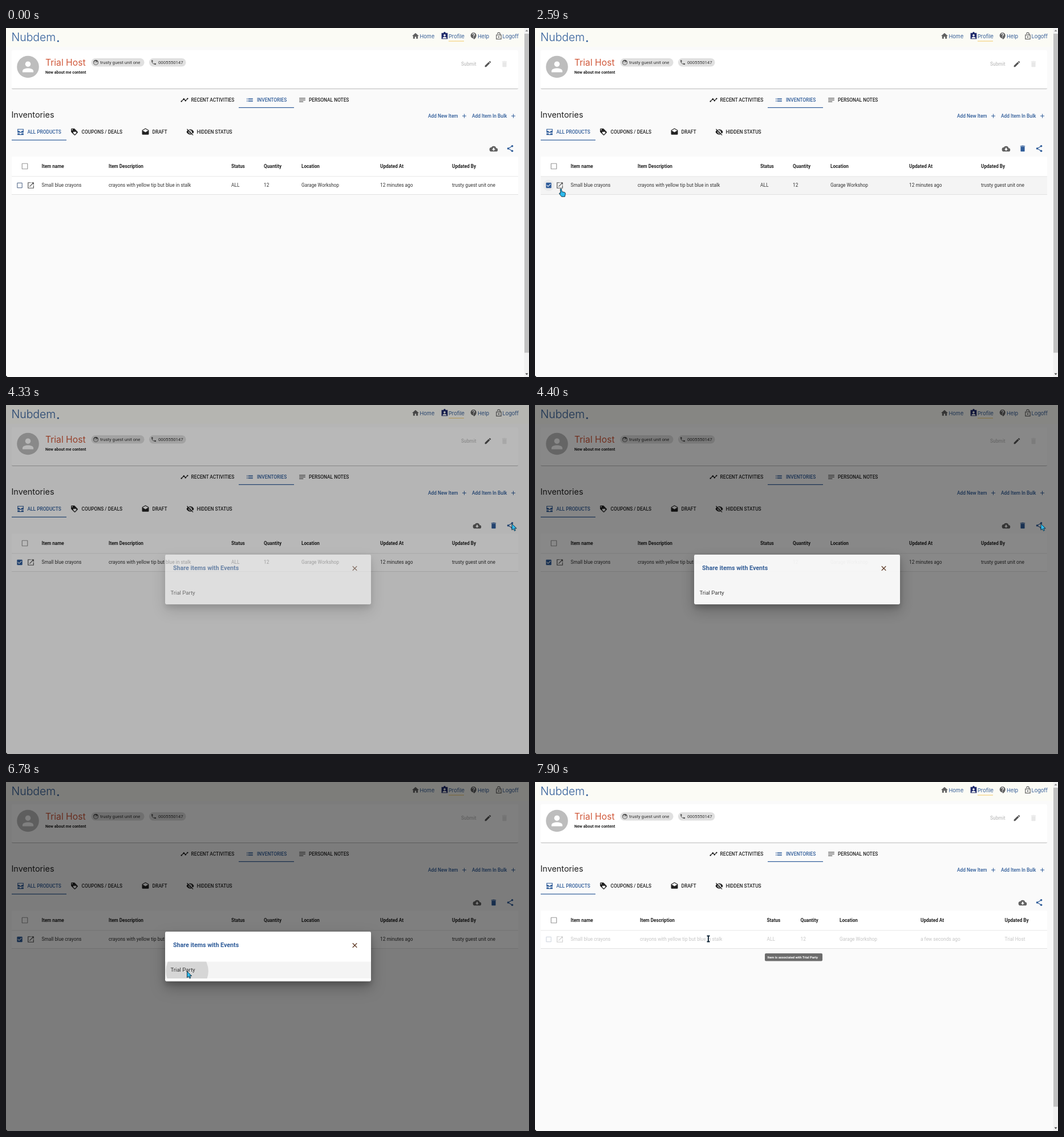
These frames come from a looping animation (917 px wide and 611 px high, 8000 ms). An HTML page:

```html
<!DOCTYPE html>
<html lang="en">
<head>
<meta charset="utf-8">
<title>Inventory</title>
<style>
html, body { margin: 0; width: 100%; height: 100%; overflow: hidden; background: #fafafa; }
svg { display: block; }
text { font: 400 8.36px Roboto, sans-serif; fill: #333; white-space: pre; }
.tab { font-weight: 500; fill: #222; }
.blue { font-weight: 500; fill: #2f5c99; }
.head { font-weight: 700; font-size: 8.2px; fill: #222; }
.chip { font-size: 7.76px; }
.nav { font: 400 9.2px Inter, sans-serif; fill: #345c96; }
.logo { font: 300 19.4px Inter, sans-serif; fill: #2f5c99; }
.name { font: 400 15.7px Inter, sans-serif; fill: #d0583a; }
.title { font: 400 14.4px Inter, sans-serif; fill: #222; }
.about { font-weight: 700; font-size: 7.05px; fill: #222; }
.off { font-weight: 500; fill: #c2c2c2; }
.dialog { font-weight: 700; font-size: 10.7px; fill: #2f5c99; }
.item { font-size: 9.55px; }
.tip { font-weight: 700; font-size: 5.8px; fill: #fff; }
symbol { overflow: visible; fill: currentColor; fill-rule: evenodd; }
.s { fill: none; stroke: currentColor; stroke-width: 2; }
#modal { filter: drop-shadow(0 6px 4px rgba(0,0,0,.16)) drop-shadow(0 10px 12px rgba(0,0,0,.26)); }
#cursor path { fill: #2fbaec; stroke: #0c2233; stroke-width: .9; stroke-linejoin: round; }
</style>
</head>
<body>
<svg width="0" height="0" style="position:absolute">
<symbol id="home" viewBox="0 0 24 24"><path d="M10 20v-6h4v6h5v-8h3L12 3 2 12h3v8z"/></symbol>
<symbol id="badge" viewBox="0 0 24 24"><path d="M3 3h6a3 3 0 0 1 6 0h6v18H3zM12 7a3 3 0 1 0 .01 0zM6 19h12c0-6-12-6-12 0z"/></symbol>
<symbol id="help" viewBox="0 0 24 24"><path d="M11.5 2a8.5 8.5 0 0 0 0 17h.5v3a13 13 0 0 0 8-11.5A8.5 8.5 0 0 0 11.5 2z"/><path d="M8.5 8a3 3 0 1 1 4.6 2.5q-1.6 1-1.6 2.5m0 1.5v2" fill="none" stroke="#fff" stroke-width="2"/></symbol>
<symbol id="unlock" viewBox="0 0 24 24"><path class="s" d="M5 9h14v12H5zM8 6a4 4 0 0 1 8 0v3"/><circle cx="12" cy="15" r="2"/></symbol>
<symbol id="person" viewBox="0 0 24 24"><circle cx="12" cy="8" r="4"/><path d="M4 20v-2c0-5.3 16-5.3 16 0v2z"/></symbol>
<symbol id="face" viewBox="0 0 24 24"><circle class="s" cx="12" cy="12" r="9"/><path d="M3.5 11.5q4-1.5 6-5.8 3.5 5 11 4L17 4H7z"/><circle cx="9" cy="13" r="1.4"/><circle cx="15" cy="13" r="1.4"/></symbol>
<symbol id="phone" viewBox="0 0 24 24"><path d="M3 4q0-1 1-1h3.5q1 0 1 1 0 2 .5 3.6.2.6-.2 1l-2.2 2.2q2.2 4.4 6.6 6.6l2.2-2.2q.5-.4 1-.2 1.6.5 3.6.5 1 0 1 1V20q0 1-1 1A17 17 0 0 1 3 4z"/></symbol>
<symbol id="edit" viewBox="0 0 24 24"><path d="M3 17.2V21h3.8L17.8 9.9l-3.7-3.7zM15.1 5.1l3.8 3.8 2.2-2.5-3.4-3.4z"/></symbol>
<symbol id="trash" viewBox="0 0 24 24"><path d="M6 7h12v12q0 2-2 2H8q-2 0-2-2zM19 4h-3.5l-1-1h-5l-1 1H5v2h14z"/></symbol>
<symbol id="chart" viewBox="0 0 24 24"><path class="s" d="M3 16l7-7 5 5 6-6"/><circle cx="3" cy="16" r="2"/><circle cx="10" cy="9" r="2"/><circle cx="15" cy="14" r="2"/><circle cx="21" cy="8" r="2"/></symbol>
<symbol id="list" viewBox="0 0 24 24"><path class="s" d="M3 8h2m2 0h14M3 12h2m2 0h14M3 16h2m2 0h14"/></symbol>
<symbol id="notes" viewBox="0 0 24 24"><path class="s" d="M3 7h18M3 12h18M3 17h12"/></symbol>
<symbol id="inbox" viewBox="0 0 24 24"><path d="M3 3h18v11H3zM5 5v4h4a3 3 0 0 0 6 0h4V5zM3 16h6a3 3 0 0 0 6 0h6v5H3z"/></symbol>
<symbol id="tag" viewBox="0 0 24 24"><path d="M2 4q0-2 2-2h7q1 0 1.5.5l9 9q1 1.4 0 2.8l-7 7q-1.5 1.2-3 0l-9-9Q2 12 2 11zM5.5 4a1.5 1.5 0 1 0 .01 0zM13 19.5l-4.3-4.3a2.5 2.5 0 0 1 4.3-2.7 2.5 2.5 0 0 1 4.3 2.7z"/></symbol>
<symbol id="draft" viewBox="0 0 24 24"><path d="M2 8q0-1.2 1-1.7L12 1l9 5.3q1 .5 1 1.7v10q0 2-2 2H4q-2 0-2-2zM12 13l8.3-5.2L12 3 3.7 7.8z"/></symbol>
<symbol id="hidden" viewBox="0 0 24 24"><path d="M1 12q3.5-7.5 11-7.5T23 12q-3.5 7.5-11 7.5T1 12zM12 7a5 5 0 1 0 .01 0zM12 9a3 3 0 1 0 .01 0z"/><path d="M4 2.2l18 18" stroke="#fafafa" stroke-width="2"/><path class="s" d="M2.6 3.6l17.8 17.8"/></symbol>
<symbol id="cloud" viewBox="0 0 24 24"><path d="M6 20a6 6 0 0 1-.7-12 7.5 7.5 0 0 1 14 2 5 5 0 0 1-.3 10zM17 13h-3V9h-4v4H7l5 5z"/></symbol>
<symbol id="share" viewBox="0 0 24 24"><path class="s" d="M18 5L6 12l12 7"/><circle cx="18" cy="5" r="3"/><circle cx="6" cy="12" r="3"/><circle cx="18" cy="19" r="3"/></symbol>
<symbol id="box" viewBox="0 0 24 24"><rect class="s" x="4" y="4" width="16" height="16" rx="1"/></symbol>
<symbol id="check" viewBox="0 0 24 24"><rect x="3" y="3" width="18" height="18" rx="2"/><path d="M5.7 11.3L10 15.6l8.3-8.3" fill="none" stroke="#fff" stroke-width="2"/></symbol>
<symbol id="open" viewBox="0 0 24 24"><path class="s" d="M12 4H4v16h16v-8M14 4h6v6M20 4L8.5 15.5"/></symbol>
<symbol id="plus" viewBox="0 0 24 24"><path class="s" d="M5 12h14M12 5v14"/></symbol>
<symbol id="cross" viewBox="0 0 24 24"><path class="s" d="M5.7 5.7l12.6 12.6m0-12.6L5.7 18.3"/></symbol>
</svg>
<svg id="stage" width="917" height="611" viewBox="0 0 917 611"></svg>
<script>
const BLUE = '#2f5c99', GREY = '#616161', DARK = '#222';
const $ = id => document.getElementById(id);
const icon = (id, x, y, color = DARK, size = 14.3) =>
  `<use href="#${id}" x="${x - size / 2}" y="${y - size / 2}" width="${size}" height="${size}" color="${color}"/>`;
const text = (s, x, y, cls = '') => `<text x="${x}" y="${y}" class="${cls}">${s}</text>`;
const rect = (x, y, w, h, fill, more = '') =>
  `<rect x="${x}" y="${y}" width="${w}" height="${h}" fill="${fill}" ${more}/>`;
const group = (id, ...parts) => `<g id="${id}">${parts.join('')}</g>`;

const guest = 'trusty guest unit one';
const heads = ['Item name', 'Item Description', 'Status', 'Quantity', 'Location', 'Updated At', 'Updated By'];
const item = ['Small blue crayons', 'crayons with yellow tip but blue in stalk', 'ALL', '12', 'Garage Workshop'];
const table = (id, xs, when, who, opacity) => group(id,
  heads.map((s, i) => text(s, xs[i], 245, 'head')).join(''),
  `<g opacity="${opacity}">`, [...item, when, who].map((s, i) => text(s, xs[i], 278)).join(''),
  icon('open', 43.5, 275.5, '#555'), '</g>');

$('stage').innerHTML = [
  rect(0, 0, 917, 611, '#fafafa'), rect(0, 0, 917, 33, '#fbfbf5'),
  text('Nubdem', 9.5, 23, 'logo'), `<circle cx="91.3" cy="23" r="1.6" fill="${BLUE}"/>`,
  icon('home', 718, 14, GREY), text('Home', 725.5, 18, 'nav'),
  icon('badge', 769, 14, '#1f2a6b'), text('Profile', 776, 18, 'nav'), rect(776, 22.5, 27, 1, '#f3c969'),
  icon('help', 820, 14, GREY), text('Help', 827, 18, 'nav'),
  icon('unlock', 864, 14, GREY), text('Logoff', 870.5, 18, 'nav'),

  rect(10, 39.5, 888, 67.5, '#bbb', 'rx="2"'), rect(9.7, 39, 888.6, 67, '#fff', 'rx="2"'),
  '<circle cx="38.5" cy="68" r="19.3" fill="#bdbdbd"/>', icon('person', 38.5, 68, '#fff', 28.6),
  text('Trial Host', 69, 66, 'name'),
  rect(149.5, 53, 93, 14.5, '#e0e0e0', 'rx="7.2"'), icon('face', 157.5, 60.3, '#444', 10.8),
  text(guest, 165, 63, 'chip'),
  rect(251, 53, 64.5, 14.5, '#e0e0e0', 'rx="7.2"'), icon('phone', 259, 60.3, '#555', 10.8),
  text('0005550147', 267, 63, 'chip'),
  group('about', text('New about me content', 69, 79.5, 'about')),
  group('skeleton', rect(69, 76.5, 237, 11.5, '#e0e0e0')),
  text('Submit', 798, 66, 'off'), icon('edit', 845, 63, '#555'), icon('trash', 874, 63, '#e8e8e8'),

  icon('chart', 313, 126), text('RECENT ACTIVITIES', 324.5, 128.6, 'tab'),
  icon('list', 427.5, 126, BLUE), text('INVENTORIES', 440, 128.6, 'blue'),
  icon('notes', 519.5, 126), text('PERSONAL NOTES', 531, 128.6, 'tab'), rect(408, 138.8, 97, 1.2, BLUE),
  text('Inventories', 9.5, 156.5, 'title'),
  text('Add New Item', 740, 157, 'blue'), icon('plus', 803.5, 154, BLUE, 12),
  text('Add Item In Bulk', 817, 157, 'blue'), icon('plus', 889.5, 154, BLUE, 12),
  icon('inbox', 25.5, 182, BLUE), text('ALL PRODUCTS', 37.5, 185, 'blue'), rect(10, 195.6, 96, 1.2, BLUE),
  icon('tag', 120, 182), text('COUPONS / DEALS', 132.5, 185, 'tab'),
  icon('draft', 244.5, 182), text('DRAFT', 256.5, 185, 'tab'),
  icon('hidden', 323, 182), text('HIDDEN STATUS', 334.5, 185, 'tab'),

  group('cloudAlone', icon('cloud', 855, 211.5, GREY)),
  group('bulk', icon('cloud', 826, 211.5, GREY), icon('trash', 855, 211, BLUE)),
  icon('share', 884, 211, BLUE),

  rect(10, 225, 888, 66.5, '#fff', 'rx="2"'), group('hover', rect(10, 260, 888, 31.5, '#f4f4f4')),
  rect(10, 259.5, 888, .8, '#e0e0e0'), rect(10, 291, 888, .8, '#dcdcdc'),
  icon('box', 33, 242, '#999'),
  '<circle id="halo" cx="24" cy="275.5" r="10" fill="rgba(0,0,0,.035)"/>',
  group('unticked', icon('box', 24, 275.5, '#4a6184', 12.5)),
  group('ticked', icon('check', 24, 275.5, BLUE, 12.5)),
  table('before', [62.5, 180, 395, 452, 518, 656, 782], '12 minutes ago', guest, 1),
  table('after', [62.5, 184, 406.5, 465.5, 534, 676, 823.5], 'a few seconds ago', 'Trial Host', .28),
  group('tooltip', rect(403, 300, 101, 13.5, '#6c6c6c', 'rx="2"'),
    text('Item is associated with Trial Party', 407.5, 309, 'tip')),

  group('scrollbar', rect(908.5, 0, 8.5, 611, '#f1f1f1'), rect(909, 10, 8, 558.5, '#c1c1c1'),
    '<path d="M910.5 6l2.5-3 2.5 3z" fill="#888"/><path d="M910.5 604.5l2.5 3 2.5-3z" fill="#444"/>'),
  group('backdrop', rect(0, 0, 917, 611, '#000')),
  group('modal', rect(279, 262, 361, 87, '#fff', 'rx="2.4"'),
    text('Share items with Events', 293, 289.3, 'dialog'), icon('cross', 611.5, 286, '#5b3620'),
    group('itemHover', rect(279, 314.5, 361, 29.5, '#f4f4f4')),
    '<clipPath id="itemBox"><rect x="279" y="314.5" width="361" height="29.5"/></clipPath>',
    '<circle id="ripple" cx="317.5" cy="331" fill="rgba(0,0,0,.12)" clip-path="url(#itemBox)"/>',
    text('Trial Party', 288.5, 332.2, 'item')),
  '<path d="M0 608.5v2.5h2.5z" fill="#000"/>',
  group('cursor',
    '<path id="arrow" d="M0 0v11l2.6-2.2 2 3.6 1.8-.9-1.8-3.5h3.6z"/>',
    '<path id="hand" d="M-1.2 0q1.4-1 2.2 0l.6 4.6 4.6 1q2 .6 1.6 3l-1 4.6H1L-3 8q0-2 2.4-.8z"/>',
    '<path id="beam" d="M-2.5-5H2.5M0-5V5M-2.5 5H2.5" style="stroke-width:1.8"/>')
].join('');

// Cursor stops: time, x, y
const stops = [
  [300, 790, 620], [1130, 42, 280], [1190, 42, 279], [1590, 24, 276], [2530, 24, 276],
  [2590, 45.5, 282], [2680, 80, 293], [3340, 884, 219], [3410, 884, 219], [3540, 887, 208],
  [4680, 887, 208], [5220, 248, 294], [5390, 318, 284], [5690, 318, 284], [5920, 317.5, 331.5],
  [7530, 317.5, 331.5], [7840, 304, 274.5], [8001, 304, 274.5]
];
const clamp = v => Math.min(1, Math.max(0, v));
const smooth = v => v * v * (3 - 2 * v);

function cursorAt(t) {
  const i = stops.findIndex(s => s[0] > t);
  if (i < 1) return [790, 640];
  const [a, b] = [stops[i - 1], stops[i]], k = smooth((t - a[0]) / (b[0] - a[0]));
  return [1, 2].map(j => a[j] + (b[j] - a[j]) * k);
}

// Cubic Bezier ease (.4, 0, .2, 1)
function standard(x) {
  let lo = 0, hi = 1, u;
  for (let i = 0; i < 20; i++) {
    u = (lo + hi) / 2;
    const px = 1.2 * (1 - u) ** 2 * u + .6 * (1 - u) * u * u + u ** 3;
    if (px < x) lo = u; else hi = u;
  }
  return 3 * (1 - u) * u * u + u ** 3;
}

const show = (id, on) => $(id).style.display = on ? '' : 'none';

function draw(t) {
  const [x, y] = cursorAt(t);
  const saved = t >= 6850, picked = t >= 2060 && !saved, modal = t >= 4247 && !saved;
  const inRow = y > 260 && y < 291;

  show('scrollbar', !modal);
  show('skeleton', modal && t < 4325);
  show('about', !modal || t >= 4325);
  show('cloudAlone', !picked);
  show('bulk', picked);
  show('ticked', picked);
  show('unticked', !picked);
  $('unticked').style.opacity = saved ? .28 : 1;
  show('before', !saved);
  show('after', saved);
  show('hover', inRow && !modal && !saved);
  show('halo', t > 1450 && t < 2660);

  const fade = modal ? standard(clamp((t - 4247) / 225)) : 0;
  show('modal', modal);
  $('modal').style.opacity = fade;
  $('backdrop').style.opacity = fade / 2;
  show('itemHover', y > 314.5 && y < 344);
  $('ripple').setAttribute('r', Math.max(0, (t - 6690) * .41));
  $('tooltip').style.opacity = smooth(clamp((t - 7780) / 120));

  const hand = t > 1080 && t < 2650, beam = saved && inRow;
  $('cursor').setAttribute('transform', `translate(${x} ${y})`);
  show('hand', hand);
  show('beam', beam);
  show('arrow', !hand && !beam);
}

const start = performance.now();
function tick() {
  draw((performance.now() - start) % 8000);
  requestAnimationFrame(tick);
}
tick();
</script>
</body>
</html>
```
